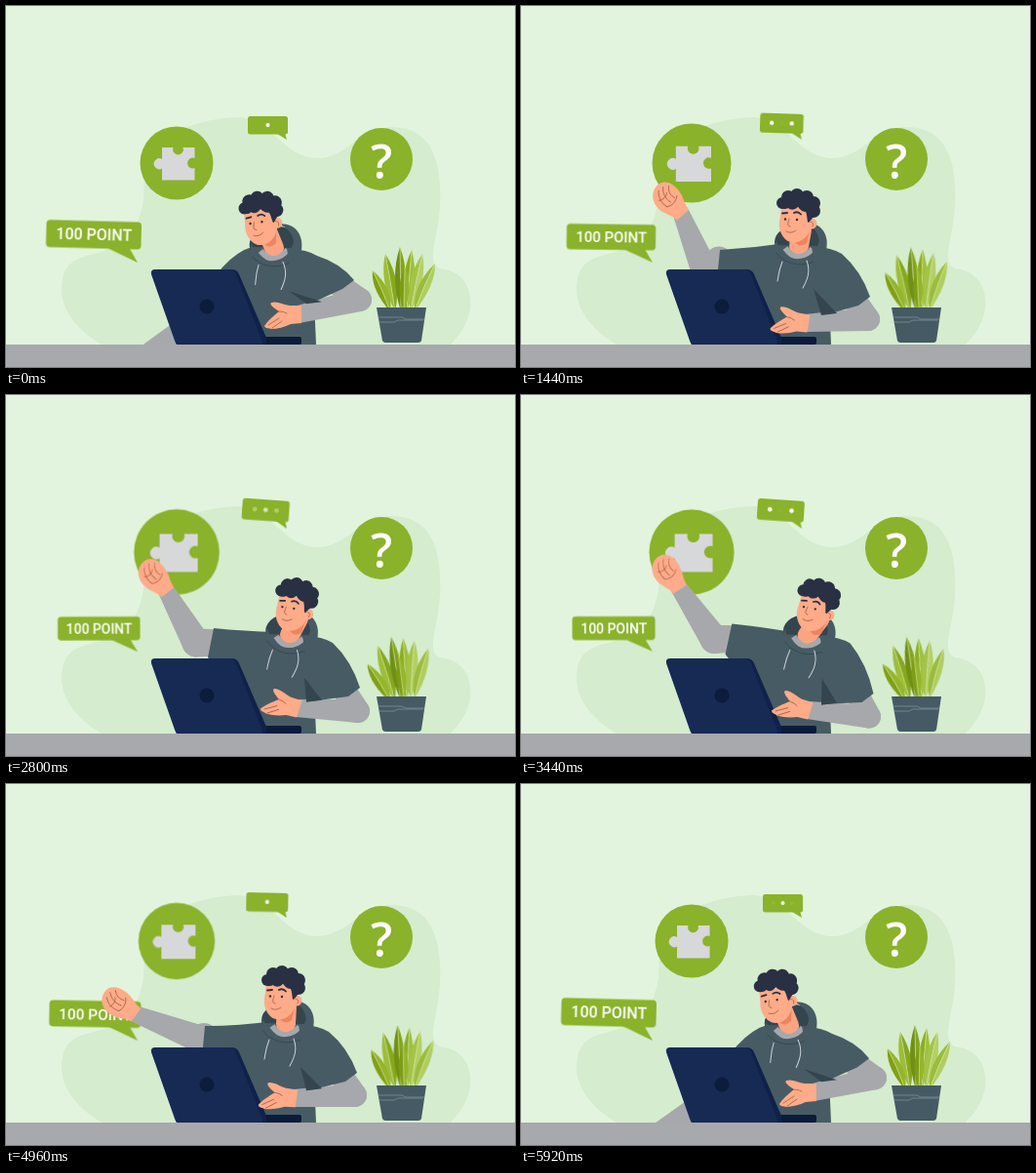
An HTML page for the animation above (6000 ms loop, 522 px wide and 370 px high).

```html
<!DOCTYPE html>
<html lang="en">
<head>
<meta charset="utf-8">
<title>Points and puzzles</title>
<style>
html, body { margin: 0; width: 100%; height: 100%; overflow: hidden; background: #e2f4de; }
svg { display: block; width: 522px; height: 370px; }
.green { fill: #8ab22b; }
.skin { fill: #fdab88; }
.hoodie { fill: #475b64; }
.shade { fill: #35454e; }
.cuff { fill: #a7a8ab; }
.ink { fill: none; stroke: #a65f48; stroke-width: .8; stroke-linecap: round; }
.label { font: 500 16px Roboto, "Open Sans", sans-serif; }
.mark { font: 600 49px "Open Sans", "Noto Sans", sans-serif; }
.label, .mark { fill: #fff; text-anchor: middle; }

.sway { animation: 3s cubic-bezier(.37, 0, .63, 1) infinite alternate; }
#puzzle { animation-name: swell; transform-origin: 175px 161px; }
#points { animation-name: settle; transform-origin: 135px 263px; }
#chat { animation-name: grow; transform-origin: 288px 137px; }
#leaves { animation-name: bend; transform-origin: 405px 312px; }
.dot { fill: #fff; animation: fade .5s cubic-bezier(.37, 0, .63, 1) infinite alternate; }
.side { animation-direction: alternate-reverse; }

@keyframes swell { to { transform: scale(1.17); } }
@keyframes settle { from { transform: rotate(1.5deg); } to { transform: rotate(-.2deg) scale(.865); } }
@keyframes grow { to { transform: rotate(4deg) scale(1.18); } }
@keyframes bend { to { transform: rotate(-8deg); } }
@keyframes fade { to { opacity: 0; } }
</style>
</head>
<body>
<svg viewBox="0 0 522 370">
  <rect width="522" height="370" fill="#e2f4de"/>
  <path fill="#d5eccf" d="M100 348C72 332 52 308 58 280C63 252 92 258 112 246C128 238 134 226 138 212C146 190 136 166 150 146C165 128 205 114 240 114C275 118 283 154 318 156C352 156 360 124 398 124C440 126 447 165 445 205C443 240 430 262 445 269C470 272 478 290 476 310C473 330 462 340 455 348Z"/>

  <g id="puzzle" class="sway">
    <circle class="green" cx="175" cy="161" r="37.5"/>
    <path fill="#d7d8da" d="M160 145H171.500A5.400 5.400 0 1 0 181.500 145H193.500V156A5.400 5.400 0 1 0 193.500 166V178.500H160V166.500A5.500 5.500 0 1 1 160 157Z"/>
  </g>

  <circle class="green" cx="385" cy="157" r="32"/>
  <text class="mark" x="385" y="176.5">?</text>

  <g id="points" class="sway">
    <rect class="green" x="40.500" y="221.500" width="97.500" height="28" rx="4"/>
    <path class="green" d="M104 249L135 263L126 248Z"/>
    <text class="label" x="89.500" y="241.500">100 POINT</text>
  </g>

  <g id="chat" class="sway">
    <rect class="green" x="248" y="113" width="41" height="18.500" rx="2.500"/>
    <path class="green" d="M278 131L288 137L286 130Z"/>
    <circle class="dot side" cx="259" cy="122" r="2"/>
    <circle class="dot" cx="268.500" cy="122" r="2"/>
    <circle class="dot side" cx="278" cy="122" r="2"/>
  </g>

  <g id="leaves" class="sway"></g>
  <path fill="#455a64" d="M380 309H431L426 343Q425 345 423 345H389Q387 345 386 343Z"/>
  <path fill="none" stroke="#76888f" stroke-width=".9" d="M382 319H406L410 321H429M383 324H398L402 322H428"/>

  <path id="upperL" class="cuff"/>
  <path id="foreL" class="cuff"/>
  <g id="fist">
    <path class="skin" d="M-3 -8C6 -9 10 -15 20 -15C31 -15 38 -7 37 2C36 10 28 13 20 13C12 13 6 9 -3 8Z"/>
    <path class="ink" d="M14 -7C20 -9 27 -8 32 -3M15 -1C21 -3 27 -2 32 3M16 5C21 3 25 4 29 8M14 -7C11 -3 12 4 16 8M24 -9C22 -5 22 -1 25 2"/>
  </g>
  <path id="sleeveL" class="hoodie"/>
  <g id="hood">
    <ellipse class="shade" cx="2" cy="-6" rx="26" ry="18"/>
    <path class="hoodie" d="M8 -26C27 -26 32 -10 29 2L20 4C25 -8 20 -20 8 -26Z"/>
  </g>
  <path id="torso" class="hoodie"/>
  <path id="neck" fill="none" stroke="#fba481" stroke-width="20" stroke-linecap="round"/>
  <g id="collar">
    <path fill="none" stroke="#a7a8ab" stroke-width="6" d="M-13 0Q0 18 15 1"/>
    <path class="hoodie" d="M-22 -8C-18 17 16 18 22 -8L29 3C20 23 -14 23 -25 3Z"/>
    <path fill="none" stroke="#35454e" stroke-width=".8" d="M-22 5C-12 20 16 22 28 4"/>
    <path fill="none" stroke="#c9d2d5" stroke-linecap="round" d="M-16 14C-20 24 -20 29 -21 34M9 13C13 24 10 32 5 41"/>
  </g>
  <g id="head">
    <path fill="#ef8460" d="M-4 17C4 18 9 13 12 8L9 21C4 25 -2 24 -4 17Z"/>
    <path class="skin" d="M-17 -16C-18 -9 -18 -6 -19 -1C-20 6 -17 13 -13 17C-9 21 -3 21 2 19C9 16 13 9 14 2L16 -14Z"/>
    <circle class="skin" cx="14" cy="1" r="5.500"/>
    <g fill="#2a3044">
      <circle cx="-16" cy="-20" r="6"/><circle cx="-10" cy="-26" r="7"/>
      <circle cx="-1" cy="-28" r="7"/><circle cx="9" cy="-26" r="7"/>
      <circle cx="16" cy="-20" r="7"/><circle cx="16" cy="-12" r="7"/>
      <path d="M-18 -16L-8 -29H8L20 -14L16 -6L11 0C9 0 10 -7 8 -11C4 -11 2 -14 0 -16C-4 -12 -8 -13 -10 -15C-13 -13 -16 -14 -18 -16Z"/>
      <circle cx="-13" cy="-3.500" r="1.200"/><circle cx="-1" cy="-3" r="1.200"/>
    </g>
    <path fill="none" stroke="#2a3044" stroke-width="1.800" stroke-linecap="round" d="M-16 -9.500L-11 -10M-4 -10Q0 -12 3 -8.500"/>
    <path class="ink" d="M-9 -4C-10 0 -12 3 -8 4M13 -1Q17 0 15 4M-12 9Q-7 12 -2 8"/>
  </g>

  <rect x="174" y="339" width="129" height="8" rx="2" fill="#0c1b3b"/>
  <path fill="#10214a" d="M158 270H231Q237 270 239 275L267 340V347H178Z"/>
  <path fill="#162a54" d="M153 270H228Q234 270 236 275L263 344Q264 347 260 347H178Q174 347 173 343L149 275Q148 270 153 270Z"/>
  <circle cx="206" cy="308" r="7.500" fill="#0c1c3d"/>

  <path id="upperR" class="cuff"/>
  <path id="foreR" class="cuff"/>
  <path id="sleeveR" class="hoodie"/>
  <path id="fold" class="shade"/>
  <g id="palm">
    <path class="skin" d="M3 -9L-9 -9C-16 -10 -22 -14 -28 -12C-30 -10 -26 -7 -20 -3C-26 2 -32 7 -35 12C-34 15 -30 14 -28 15C-22 15 -14 13 -8 10L3 9Z"/>
    <path class="ink" d="M-31 11L-20 4M-27 14L-17 7M-20 -3Q-15 -3 -12 -1"/>
  </g>
  <rect y="347" width="522" height="23" fill="#a7a9ac"/>
</svg>
<script>
const LOOP = 6000;
const times = [0, 640, 1440, 2800, 4080, 4960];

// Each track holds one pose per entry in `times`.
const tracks = {
  collar: [[274, 250], [277, 250], [284, 248], [290, 248], [294, 249], [286, 248]],
  head: [[264, 224], [267, 223], [284, 222], [296, 222], [306, 223], [284, 221]],
  tilt: [[-11], [-5], [0], [6], [10], [0]],
  hemTop: [[200, 300], [196, 296], [204, 250], [213, 239], [218, 232], [204, 248]],
  hemLow: [[222, 322], [212, 318], [202, 271], [207, 269], [211, 263], [202, 270]],
  elbowL: [[205, 318], [195, 308], [190, 275], [195, 254], [201, 249], [203, 263]],
  wristL: [[140, 358], [128, 296], [164, 212], [164, 200], [155, 195], [131, 235]],
  fistTurn: [[152], [182], [230], [232], [240], [216]],
  cuffR: [[357, 281], [358, 285], [358, 298], [363, 300], [360, 311], [360, 296]],
  elbowR: [[363, 301], [362, 304], [356, 321], [361, 324], [353, 334], [358, 319]],
  wristR: [[300, 316], [299, 320], [292, 325], [298, 321], [290, 325], [295, 322]],
  palmTurn: [[0], [0], [10], [18], [18], [8]]
};

const el = id => document.getElementById(id);
const draw = (id, d) => el(id).setAttribute('d', d);
const place = (id, [x, y], turn) =>
  el(id).setAttribute('transform', `translate(${x} ${y}) rotate(${turn})`);
const shift = ([x, y], dx, dy) => [x + dx, y + dy];
const mix = (a, b, k) => a.map((v, i) => v + (b[i] - v) * k);

// Periodic cubic that never overshoots its keys.
function sample(keys, t, axis) {
  const n = times.length;
  const span = i => (times[(i + 1) % n] - times[i] + LOOP) % LOOP;
  const slope = i => (keys[(i + 1) % n][axis] - keys[i][axis]) / span(i);
  const tangent = i => {
    const a = slope((i + n - 1) % n), b = slope(i);
    return a * b <= 0 ? 0 : 2 * a * b / (a + b);
  };
  let i = n - 1;
  while (times[i] > t) i--;
  const j = (i + 1) % n, w = span(i), u = (t - times[i]) / w;
  const s = u * u * (3 - 2 * u);
  return keys[i][axis] * (1 - s) + keys[j][axis] * s
    + w * u * (1 - u) * (tangent(i) * (1 - u) - tangent(j) * u);
}

// Tapered limb with round ends.
function limb(a, b, ra, rb) {
  const dx = b[0] - a[0], dy = b[1] - a[1], len = Math.hypot(dx, dy) || 1;
  const side = (p, r) => [p[0] - dy / len * r, p[1] + dx / len * r];
  return `M${side(a, ra)}L${side(b, rb)}A${rb} ${rb} 0 0 0 ${side(b, -rb)}` +
    `L${side(a, -ra)}A${ra} ${ra} 0 0 0 ${side(a, ra)}Z`;
}

function addLeaf([base, tipX, tipY, width, dark, light]) {
  const midX = base + (tipX - base) * .45, midY = 309 + (tipY - 309) * .5;
  const root = `${base} 313`, tip = `${tipX} ${tipY}`;
  const half = (dx, fill) =>
    `<path fill="${fill}" d="M${root}Q${midX + dx} ${midY} ${tip}Q${midX} ${midY} ${root}Z"/>`;
  el('leaves').innerHTML += half(-width, dark) + half(width, light) +
    `<path fill="none" stroke="#d8e8a0" stroke-width=".6" d="M${root}Q${midX} ${midY} ${tip}"/>`;
}

[
  [411, 416, 250, 11, '#8aad22', '#9fc03c'],
  [399, 389, 254, 12, '#9dbd3a', '#86a81f'],
  [405, 404, 247, 11, '#6f8f16', '#84a51c'],
  [415, 427, 254, 12, '#a3c34a', '#b4d064'],
  [394, 376, 271, 12, '#809f14', '#94b52c'],
  [419, 440, 264, 12, '#9abc3e', '#b0cd5c'],
  [408, 409, 268, 10, '#7d9c17', '#94b52c']
].forEach(addLeaf);

function pose(t) {
  const p = {};
  for (const name in tracks)
    p[name] = tracks[name][0].map((_, axis) => sample(tracks[name], t, axis));
  const c = p.collar, lean = p.tilt[0] * .4;
  const shoulder = shift(c, 45, 6);
  const outer = shift(mix(shoulder, p.cuffR, .5), 5, -5);
  const armpit = [314, mix(p.wristR, p.elbowR, .25)[1] - 8];

  draw('upperL', limb(mix(p.hemTop, p.hemLow, .5), p.elbowL, 14, 14.5));
  draw('foreL', limb(p.elbowL, p.wristL, 14.5, 8.5));
  place('fist', p.wristL, p.fistTurn[0]);
  const drape = [c[0] - 46, Math.min(248, p.hemTop[1] + 3)];
  draw('sleeveL', `M${shift(c, -12, -5)}Q${drape} ${p.hemTop}L${p.hemLow}L240 305L${shift(c, 0, 20)}Z`);
  draw('torso', `M${shift(c, -22, -3)}L236 272L226 347H318L316 302L${shift(c, 38, 12)}L${shift(c, 20, -2)}Z`);
  place('hood', c, lean);
  place('collar', c, lean);
  draw('neck', `M${shift(c, 1, -2)}L${shift(p.head, 4, 7)}`);
  place('head', p.head, p.tilt[0]);

  draw('upperR', limb(shift(p.cuffR, -14, 6), p.elbowR, 12, 12));
  draw('foreR', limb(p.elbowR, p.wristR, 12, 9));
  draw('sleeveR', `M${shift(c, 14, -2)}Q${shift(c, 36, 0)} ${shoulder}Q${outer} ${p.cuffR}` +
    `L${shift(p.cuffR, -12, 9)}L${armpit}L${shift(c, 20, 40)}Z`);
  draw('fold', `M${shift(c, 16, 42)}L${shift(armpit, 10, -1)}L${shift(armpit, -6, 1)}Z`);
  place('palm', p.wristR, p.palmTurn[0]);
}

function tick() {
  pose(performance.now() % LOOP);
  requestAnimationFrame(tick);
}
tick();
</script>
</body>
</html>
```
